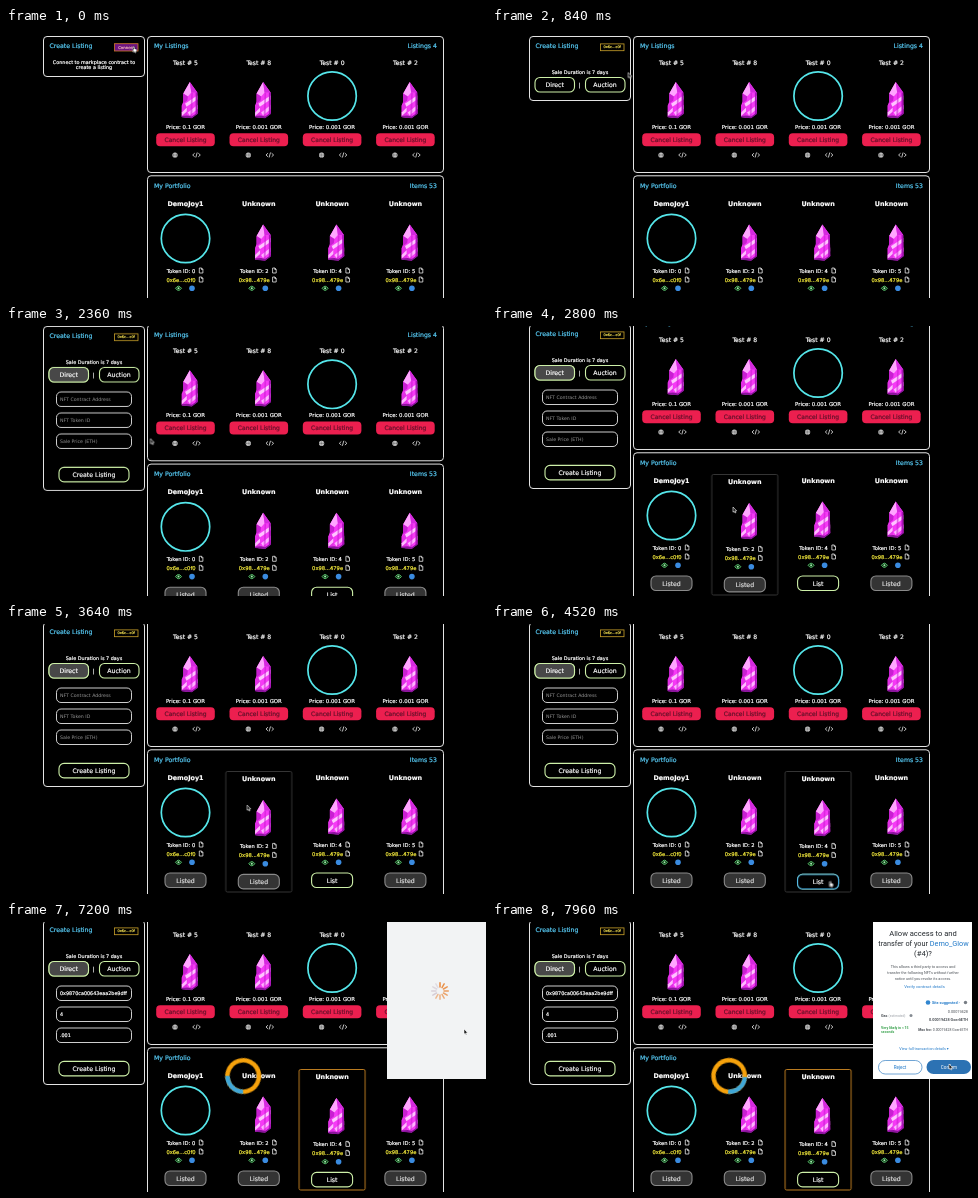
These frames come from a looping animation (480 px wide and 270 px high, 8 s). An HTML page:

```html
<!DOCTYPE html>
<html lang="en">
<head>
<meta charset="utf-8">
<title>Marketplace listing</title>
<style>
html, body { margin: 0; width: 100%; height: 100%; overflow: hidden; background: #000; }
svg { display: block; width: 100vw; height: 100vh; }
text {
  font-family: "DejaVu Sans", sans-serif; dominant-baseline: central;
  fill: var(--ink, #fff); stroke: var(--ink, #fff); stroke-width: .2;
}
.mid { text-anchor: middle; }
.end { text-anchor: end; }
.bold { font-weight: bold; }
.head { font-size: 6.2px; --ink: #58cdf8; }
.panel { fill: #000; stroke: #e4e4e4; }
.btn { fill: #000; stroke: #cdf0a8; stroke-width: 1.1; }
.grey { fill: #343434; stroke: #8a8a8a; }
.picked { fill: #484848; }
.field { fill: #000; stroke: #e6e6e6; stroke-width: .9; }
.hint { font-size: 4.7px; --ink: #969696; stroke: none; }
.value { font-size: 4.85px; }
.wallet text { font-family: Roboto, sans-serif; --ink: #4a4f55; font-size: 3.8px; stroke: none; }
.wallet .big { font-size: 7.6px; --ink: #24292e; }
.wallet text.blue { --ink: #1f78c8; }
.wallet tspan.blue { fill: #1f78c8; }
.wallet .tiny { font-size: 3.5px; }
.wallet .btxt { font-size: 4.6px; }

#page, #side, #cursor { animation: 8s infinite; }
#page { animation-name: page; }
#side { animation-name: side; }
#cursor { animation-name: cursor; }
#pointer { animation: pointer 8s step-end infinite; }
.lift1 { animation: lift1 8s step-end infinite; }
.lift2 { animation: lift2 8s step-end infinite; }
#ring { animation: turn 1s linear infinite; }
#spokes { animation: turn 1s steps(12) infinite; }

@keyframes page {
  0%, 28% { transform: translateY(0); }
  33.5%, 35% { transform: translateY(-21px); }
  36.5%, 100% { transform: translateY(-22px); }
}
@keyframes side {
  0%, 28% { transform: translateY(0); }
  31%, 100% { transform: translateY(-10px); }
}
@keyframes cursor {
  0%, 8% { transform: translate(127px, 19px); }
  17%, 18.5% { transform: translate(146.5px, 73px); }
  24.5%, 27.5% { transform: translate(66px, 57px); }
  35%, 45.5% { transform: translate(241px, 181px); }
  51.5%, 54% { transform: translate(330px, 238px); }
  56.5%, 60.5% { transform: translate(337.5px, 257.5px); }
  67.5%, 78% { transform: translate(85px, 112px); }
  80.5%, 82% { transform: translate(88px, 147px); }
  88.5%, 93.5% { transform: translate(458px, 107px); }
  97.5%, 100% { transform: translate(457px, 142px); }
}
@keyframes pointer {
  0% { opacity: 1; }
  71.5% { opacity: 0; }
  78% { opacity: 1; }
}
@keyframes lift1 {
  0% { transform: none; }
  33.5% { transform: translateY(1.4px); }
  48.5% { transform: none; }
}
@keyframes lift2 {
  0% { transform: none; }
  48.5% { transform: translateY(1.4px); }
}
@keyframes turn { to { transform: rotate(360deg); } }
</style>
</head>
<body>
<svg id="stage" viewBox="0 0 480 270" preserveAspectRatio="none">
  <defs>
    <g id="crystal">
      <path d="M0-18.500 7.500-8 7.800 13 2 17.500-8 16.500V5L-6.500 1V-7Z" fill="#f63af6"/>
      <path d="M0-18.500-6.500-7-2-4 1.500-8Z" fill="#ffa6ff"/>
      <path d="M0-18.500 7.500-8 1.500-8Z" fill="#d42ade"/>
      <path d="M-6.500-7-2-4-2.500 0-6.500 3Z" fill="#c81fd2"/>
      <path d="M-6 4 7.500-5V-1L-6 8Z" fill="#ffc4ff"/>
      <path d="M-2 12 7.700 4.500V8.500L0 15Z" fill="#ffb2ff"/>
      <path d="M1.500-8 3-7.500 2.500 16 .5 16Z" fill="#c41cce" opacity=".55"/>
      <path d="M5.800-8 7.500-8 7.800 13 5.800 14.500Z" fill="#a812b8"/>
      <path d="M-8 5-5 2.500-2.500 8-3 17-8 16.500Z" fill="#e22fe6"/>
      <path d="M-8 12-3 7-3 11-8 15.500Z" fill="#ffbaff"/>
      <path d="M-8 15.500-2 15 2 16 7.800 12V13.500L2 17.800-8 16.800Z" fill="#8a149c"/>
    </g>
    <g id="globe">
      <circle r="2.6" fill="#eee"/>
      <path d="M-2.600 0H2.600M0-2.600V2.600M-1.300-2Q-2 0-1.300 2M1.300-2Q2 0 1.300 2" fill="none" stroke="#222" stroke-width=".4"/>
    </g>
    <path id="code" d="M-1.800-1.800-3.800 0-1.800 1.800M1.800-1.800 3.800 0 1.800 1.800M.7-2.500-.7 2.500" fill="none" stroke="#eee" stroke-width=".8"/>
    <path id="doc" d="M-1.700-2.500H.7L1.900-1.200V2.500H-1.700ZM.5-2.400V-1H1.800" fill="none" stroke="#e8e8e8" stroke-width=".8"/>
    <g id="eye">
      <path d="M-3 0Q0-4.200 3 0 0 4.200-3 0Z" fill="#0b2a10" stroke="#5fcf74" stroke-width=".9"/>
      <circle r="1" fill="#a0f0ae"/>
    </g>
  </defs>

  <g id="page"></g>

  <g id="side">
    <g data-on="0 600">
      <rect class="panel" x="37.500" y="8.500" width="101" height="40" rx="3.500"/>
      <rect x="108.500" y="15.700" width="23.500" height="7.300" fill="#6d1480" stroke="#d07a2a" stroke-width=".8"/>
      <text class="mid" x="120.200" y="19.500" font-size="3.900" style="--ink:#f0b2b8">Connect</text>
      <text class="mid" x="88" y="33.800" font-size="4.900">Connect to markplace contract to</text>
      <text class="mid" x="88" y="38.800" font-size="4.900">create a listing</text>
    </g>
    <g data-on="600 8000">
      <rect class="panel" data-on="600 2040" x="37.500" y="8.500" width="101" height="64" rx="3.500"/>
      <rect class="panel" data-on="2040 8000" x="37.500" y="8.500" width="101" height="164" rx="3.500"/>
      <rect x="108.500" y="15.900" width="23.500" height="6.800" fill="#000" stroke="#c9a02a" stroke-width=".8"/>
      <text class="mid" x="120.200" y="19.300" font-size="3.500" style="--ink:#f0dc50">0x6c…c0f</text>
      <text class="mid" x="88" y="43.500" font-size="4.900">Sale Duration is 7 days</text>
      <rect class="btn" x="43" y="49.500" width="39.500" height="14.500" rx="5"/>
      <rect class="btn picked" data-on="2000 8000" x="43" y="49.500" width="39.500" height="14.500" rx="5"/>
      <rect class="btn" x="93.500" y="49.500" width="39.500" height="14.500" rx="5"/>
      <text class="mid" x="62.700" y="56.600" font-size="6.200">Direct</text>
      <text class="mid" x="87.800" y="56.500" font-size="5.500">|</text>
      <text class="mid" x="113" y="56.600" font-size="6.200">Auction</text>
    </g>
    <g data-on="2040 8000" id="form"></g>
    <text class="head" x="43.500" y="17.800">Create Listing</text>
  </g>

  <g data-on="6560 8000" transform="translate(237.200 154)">
    <g id="ring" fill="none" stroke-width="4.400">
      <circle r="15.700" stroke="#f6a20c"/>
      <circle r="15.700" stroke="#3fa7d8" pathLength="360" stroke-dasharray="90 270" transform="rotate(18)"/>
    </g>
  </g>

  <g class="wallet" data-on="6800 8000">
    <rect x="381" width="99" height="157" fill="#f2f3f4"/>
    <g transform="translate(434 69) rotate(-60)"><g id="spokes"></g></g>
    <g data-on="7480 8000">
      <rect x="381" width="99" height="157" fill="#fff"/>
      <text class="big mid" x="431" y="11.500">Allow access to and</text>
      <text class="big mid" x="431.500" y="21.300" style="font-size:7.300px">transfer of your <tspan class="blue">Demo_Glow</tspan></text>
      <text class="big mid" x="431" y="31">(#4)?</text>
      <text class="mid" x="431" y="44">This allows a third party to access and</text>
      <text class="mid" x="431" y="50">transfer the following NFTs without further</text>
      <text class="mid" x="431" y="56">notice until you revoke its access.</text>
      <text class="mid blue" x="432.500" y="64" style="font-size:4.200px">Verify contract details</text>
      <circle cx="436" cy="80.500" r="2.300" fill="#3186d0"/>
      <text class="blue bold" x="440" y="80.700">Site suggested ›</text>
      <circle cx="473.500" cy="80.500" r="1.700" fill="#777d84"/>
      <text class="end" x="476" y="89.300">0.00019428</text>
      <text class="bold" x="389" y="93.500">Gas <tspan fill="#9a9fa5" font-weight="400" font-size="3.300">(estimated)</tspan></text>
      <circle cx="419" cy="93.500" r="1.500" fill="#858b92"/>
      <text class="bold end" x="476" y="97.800">0.00019428 GoerliETH</text>
      <text class="bold tiny" x="389" y="105.500" style="--ink:#35a04a">Very likely in &lt; 15</text>
      <text class="bold tiny" x="389" y="110" style="--ink:#35a04a">seconds</text>
      <text class="end tiny" x="476" y="107.800"><tspan font-weight="700">Max fee:</tspan> 0.00019428 GoerliETH</text>
      <text class="mid blue" x="432" y="126">View full transaction details ▾</text>
      <rect x="386.500" y="138.500" width="43.500" height="13.500" rx="6.700" fill="#fff" stroke="#4c8fcb" stroke-width=".8"/>
      <rect x="434.500" y="138" width="44.500" height="14" rx="7" fill="#2c72b3"/>
      <text class="mid btxt blue" x="408" y="145.300">Reject</text>
      <text class="mid btxt" x="457" y="145.300" style="--ink:#fff">Confirm</text>
    </g>
  </g>

  <g id="cursor">
    <path id="pointer" d="M0 0V5.200L1.200 4.200 2 6 2.900 5.600 2.100 3.900H3.700Z" fill="#111" stroke="#fff" stroke-width=".6"/>
    <g id="hands"></g>
  </g>
</svg>

<script>
const LOOP = 8000;
const get = id => document.getElementById(id);
const colX = i => 179.5 + 73.3 * i;
const use = (id, x, y) => `<use href="#${id}" x="${x}" y="${y}"/>`;
const text = (s, x, y, size, cls = "mid", ink = "#fff") =>
  `<text class="${cls}" x="${x}" y="${y}" font-size="${size}" style="--ink:${ink}">${s}</text>`;
const box = (cls, x, y, w, h, rx, extra = "") =>
  `<rect class="${cls}" x="${x}" y="${y}" width="${w}" height="${h}" rx="${rx}" ${extra}/>`;
const head = (s, x, y, cls = "") => `<text class="head ${cls}" x="${x}" y="${y}">${s}</text>`;

const art = (round, y) => round
  ? `<circle cy="${y}" r="24.2" fill="#000" stroke="#55e6ea" stroke-width="1.7"/>`
  : use("crystal", 4.3, y + 4.5);

function listing([name, price, round], i) {
  return `<g transform="translate(${colX(i)} 0)">
    ${text(name, 0, 34.5, 6.1)}${art(round, 68)}
    ${text(`Price: ${price} GOR`, 0, 99, 5.4)}
    ${box("", -29.3, 105.2, 58.6, 13, 4, 'fill="#ec1f4f"')}
    ${text("Cancel Listing", 0, 111.5, 6, "mid", "#64102a")}
    ${use("globe", -10.5, 127)}${use("code", 11, 127)}</g>`;
}

function item([name, id, addr, open], i) {
  const frame = (color, on) =>
    box("", -33, 169.5, 66, 120.5, 1.5, `fill="#000" stroke="${color}" stroke-width=".9" data-on="${on}"`);
  const frames = i === 1 ? frame("#3c3c3c", "2680 3880")
    : i === 2 ? frame("#3c3c3c", "3880 4840") + frame("#d08a24", "4840 8000") : "";
  const active = open
    ? box("btn", -20.5, 271, 41, 14.5, 5, 'data-on="4400 4920" style="stroke:#45b4ee"') : "";
  return `<g transform="translate(${colX(i)} 0)">${frames}<g class="lift${i}">
    ${text(name, 0, 176, 6.4, "mid bold")}${art(!i, 210.5)}
    ${text(`Token ID: ${id}`, -4.5, 243, 5.2)}${use("doc", 15.5, 242.5)}
    ${text(addr, -4.5, 252, 5.2, "mid", "#f4ea3c")}${use("doc", 15.5, 251.5)}
    ${use("eye", -7, 260.3)}<circle cx="6.5" cy="260.3" r="2.8" fill="#3a8be0"/>
    ${box(open ? "btn" : "btn grey", -20.5, 271, 41, 14.5, 5)}${active}
    ${text(open ? "List" : "Listed", 0, 278.2, 6.2, "mid", open ? "#fff" : "#ddd")}</g></g>`;
}

const listings = [["Test # 5", "0.1"], ["Test # 8", "0.001"], ["Test # 0", "0.001", true], ["Test # 2", "0.001"]];
const items = [
  ["DemoJoy1", 0, "0x6e...c0f0"], ["Unknown", 2, "0x98...479e"],
  ["Unknown", 4, "0x98...479e", true], ["Unknown", 5, "0x98...479e"]
];
get("page").innerHTML =
  box("panel", 141.5, 8.5, 296, 136, 3.5) + head("My Listings", 148, 17.8) + head("Listings 4", 431, 17.8, "end") +
  listings.map(listing).join("") +
  box("panel", 141.5, 147.8, 296, 160, 3.5) + head("My Portfolio", 148, 157.2) + head("Items 53", 431, 157.2, "end") +
  items.map(item).join("");

const fieldY = [81.2, 102.2, 123.2];
const field = (y, extra) => box("field", 50.5, y - 7.2, 75, 14.5, 4.5, extra);
const entry = (s, row, cls, on) => `<text class="${cls}" x="54" y="${fieldY[row]}" data-on="${on}">${s}</text>`;
const typed = [[".", 5720, 5800], [".0", 5800, 5920], [".00", 5920, 6000], [".001", 6000, LOOP]];
get("form").innerHTML =
  fieldY.map(y => field(y)).join("") +
  `<g data-on="5440 6480">${field(fieldY[2], 'style="stroke:#4a86e0;stroke-width:1.2"')}
    <rect x="117" y="120.800" width="4.800" height="4.800" rx=".8" fill="#e8edf2"/>
    <path d="M118 122.200H120.800M118 124H120.800" stroke="#555" stroke-width=".6"/></g>` +
  entry("NFT Contract Address", 0, "hint", "2040 4840") + entry("NFT Token ID", 1, "hint", "2040 4840") +
  entry("Sale Price (ETH)", 2, "hint", "2040 5720") +
  entry("0x9870ca00643eaa2be9dff", 0, "value", "4840 8000") + entry("4", 1, "value", "4840 8000") +
  typed.map(([s, a, b]) => entry(s, 2, "value", `${a} ${b}`)).join("") +
  '<path d="M65.200 120.500V126" stroke="#fff" stroke-width=".5" data-on="6000 6480"/>' +
  box("btn", 53, 149.4, 70, 14.5, 5) + text("Create Listing", 88, 156.5, 6.2);

get("spokes").innerHTML = Array.from({ length: 12 }, (_, i) =>
  `<path d="M0-4V-8.300" stroke="${i < 8 ? "#e9893c" : "#b9a3b4"}" stroke-width="1.500" stroke-linecap="round"
    opacity="${1 - i * .065}" transform="rotate(${i * 30})"/>`).join("");

// The pointer turns into a white hand over buttons.
get("hands").innerHTML = ["0 680", "4400 4920"].map(on =>
  `<path d="M.8-.5V2.200L-.6 2.500 1 5H3.300L4 2.400 1.800 1.700V-.5Z" fill="#fff" stroke="#000" stroke-width=".4" data-on="${on}"/>`).join("");

// Each data-on="from to" becomes a hard on/off keyframe rule.
const rules = new Set();
const pct = ms => ms / LOOP * 100 + "%";
document.querySelectorAll("[data-on]").forEach(el => {
  const [a, b] = el.dataset.on.split(" ").map(Number);
  const name = `on-${a}-${b}`;
  rules.add(`@keyframes ${name} {${a ? "0% {opacity: 0}" : ""} ${pct(a)} {opacity: 1} ${b < LOOP ? pct(b) + " {opacity: 0}" : ""}}`);
  el.style.animation = `${name} ${LOOP}ms step-end infinite`;
});
const sheet = document.createElement("style");
sheet.textContent = [...rules].join("\n");
document.head.append(sheet);
</script>
</body>
</html>
```
